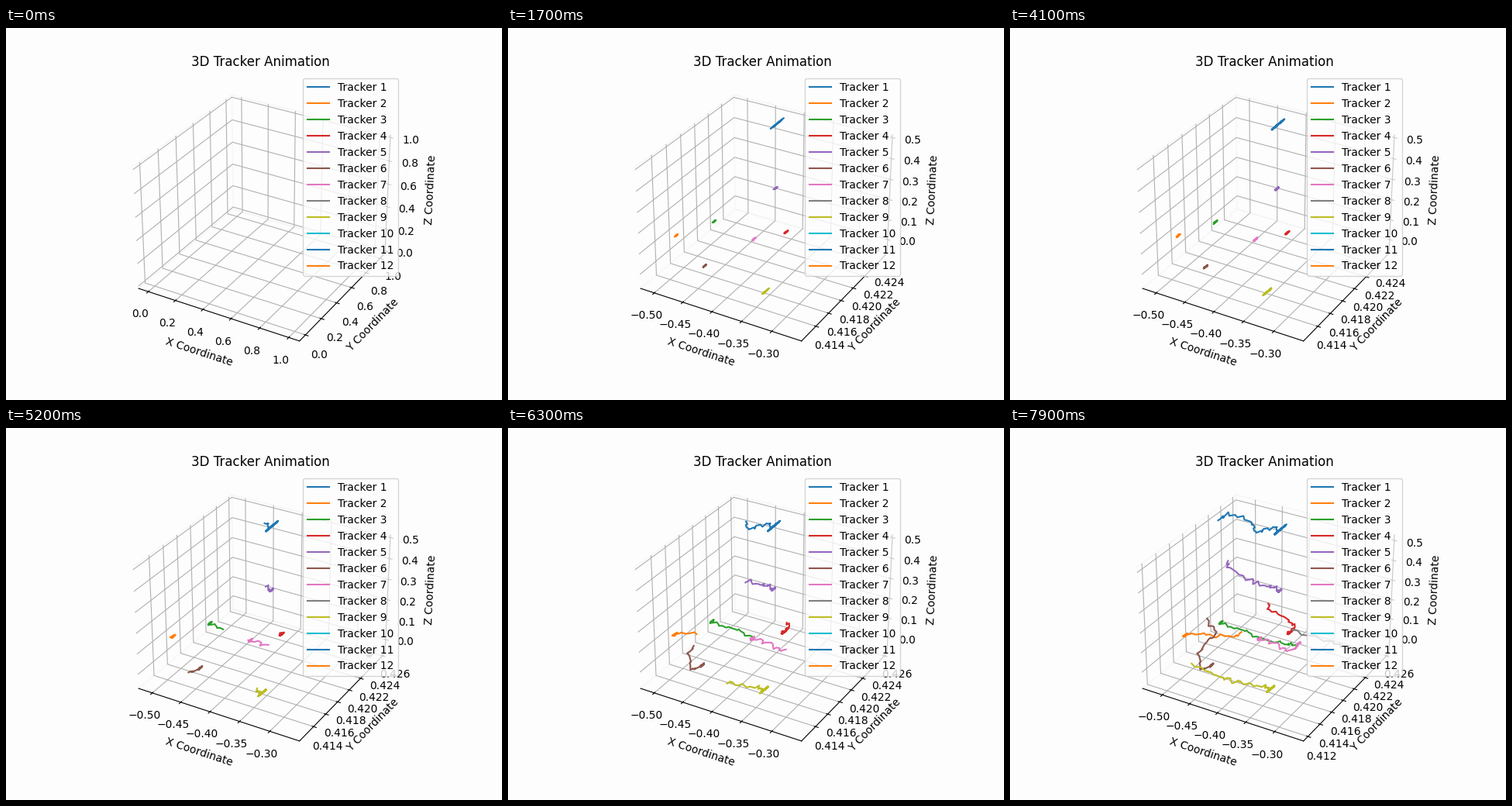
Animation of 640x480 px, one loop 8000 ms. Source, as a matplotlib script:

```python
import matplotlib.pyplot as plt
import numpy as np
from matplotlib.animation import FuncAnimation

WIDTH, HEIGHT, FRAMES, INTERVAL = 640, 480, 80, 100
LAST = FRAMES - 1
REST_END = 44
BACKGROUND = "#fdfdfd"
SWAY_DIRECTION = np.array([0.77, -0.64])

fig = plt.figure(figsize=(WIDTH / 100, HEIGHT / 100), dpi=100, facecolor=BACKGROUND)
ax = fig.add_subplot(projection="3d", facecolor=BACKGROUND)
ax.set_title("3D Tracker Animation")
ax.set_xlabel("X Coordinate")
ax.set_ylabel("Y Coordinate")
ax.set_zlabel("Z Coordinate")
for axis in (ax.xaxis, ax.yaxis, ax.zaxis):
    axis.pane.set_facecolor("none")
    axis.pane.set_edgecolor("0.94")


def ramp(frame, start, end):
    return np.clip((frame - start) / (end - start), 0, 1)


def data_ranges(frame):
    """Low and high of x, y and z, widening as the trackers move out."""
    if frame == 0:
        return [(0, 1)] * 3
    x_low = -0.507 - 0.0115 * ramp(frame, 63, 71)
    y_low = 0.4127 - 0.00045 * ramp(frame, 71, LAST)
    y_high = 0.425 + 0.00055 * ramp(frame, 36, 52)
    z_low = -0.0587 - 0.0135 * ramp(frame, 52, 64)
    z_high = 0.5005 + 0.0135 * ramp(frame, 63, 71)
    return [(x_low, -0.2691), (y_low, y_high), (z_low, z_high)]


def fit_axis(axis, set_limits, data_range, margin, step):
    low, high = data_range
    pad = margin * (high - low)
    low, high = low - pad, high + pad
    axis.set_ticks(np.arange(np.ceil(low / step), np.floor(high / step) + 1) * step)
    edge = (high - low) / 48
    set_limits(low - edge, high + edge)


def fit_axes(frame):
    x_range, y_range, z_range = data_ranges(frame)
    steps = (0.05, 0.002, 0.1) if frame else (0.2, 0.2, 0.2)
    fit_axis(ax.xaxis, ax.set_xlim3d, x_range, 0.05, steps[0])
    fit_axis(ax.yaxis, ax.set_ylim3d, y_range, 0.05, steps[1])
    fit_axis(ax.zaxis, ax.set_zlim3d, z_range, 0, steps[2])


fit_axes(LAST)
fig.canvas.draw()
projection = ax.get_proj()
to_view = ax.transData.inverted()
rng = np.random.default_rng(7)


def unproject(pixel, x):
    """Point in the plane of constant x that is seen at the pixel."""
    u, v = to_view.transform((pixel[0], HEIGHT - pixel[1]))
    rows = projection[:2] - np.outer((u, v), projection[3])
    y, z = np.linalg.solve(rows[:, 1:3], -rows[:, 0] * x - rows[:, 3])
    return x, y, z


def make_track(depth, *stops, sway=3):
    """Sway about the first stop, then wander evenly through the others."""
    frames = np.arange(FRAMES)
    times = np.linspace(REST_END, LAST, len(stops))
    path = np.column_stack([np.interp(frames, times, c) for c in zip(*stops)])
    resting = frames < REST_END
    swing = np.where(resting, sway, 1.5 + 0.2 * sway) * rng.uniform(-1, 1, FRAMES)
    wobble = rng.normal(0, np.where(resting, 0.3, 0.9), (2, FRAMES)).T
    path += swing[:, None] * SWAY_DIRECTION + wobble
    low, high = data_ranges(LAST)[0]
    x = low + depth * (high - low)
    return np.array([unproject(p, x) for p in path]).T


# Each tracker: depth along x, then its stops as seen on the final view.
tracks = [
    make_track(0.35, (349, 131), (340, 128), (315, 136), (313, 120),
               (280, 111), (267, 121), sway=10),
    make_track(0, (227, 267), (225, 268), (240, 266), (262, 268), (290, 270), (298, 265)),
    make_track(0.1, (272, 251), (288, 258), (308, 264), (334, 274), (358, 277), (369, 281)),
    make_track(0.6, (361, 264), (360, 264), (368, 258), (360, 248), (334, 235), (333, 224)),
    make_track(0.5, (348, 210), (342, 206), (327, 204), (307, 195), (281, 179), (281, 171)),
    make_track(0.05, (260, 306), (245, 312), (243, 289), (254, 276), (267, 264), (252, 244)),
    make_track(0.45, (322, 272), (342, 278), (355, 287), (369, 284), (372, 279), (374, 277)),
    make_track(0.9, (472, 289), (466, 291), (450, 287), (427, 281), (405, 274), (357, 259)),
    make_track(0.5, (336, 337), (329, 333), (300, 330), (283, 324),
               (268, 321), (229, 302), sway=7),
]

lines = [ax.plot([], [], [], label=f"Tracker {n}")[0] for n in range(1, 13)]
ax.legend(loc="upper right", facecolor=BACKGROUND)


def update(frame):
    fit_axes(frame)
    for line, track in zip(lines, tracks):
        line.set_data_3d(*track[:, :frame])
    return lines


animation = FuncAnimation(fig, update, frames=FRAMES, interval=INTERVAL,
                          init_func=lambda: update(0), repeat=True, repeat_delay=0)
plt.show()
```
